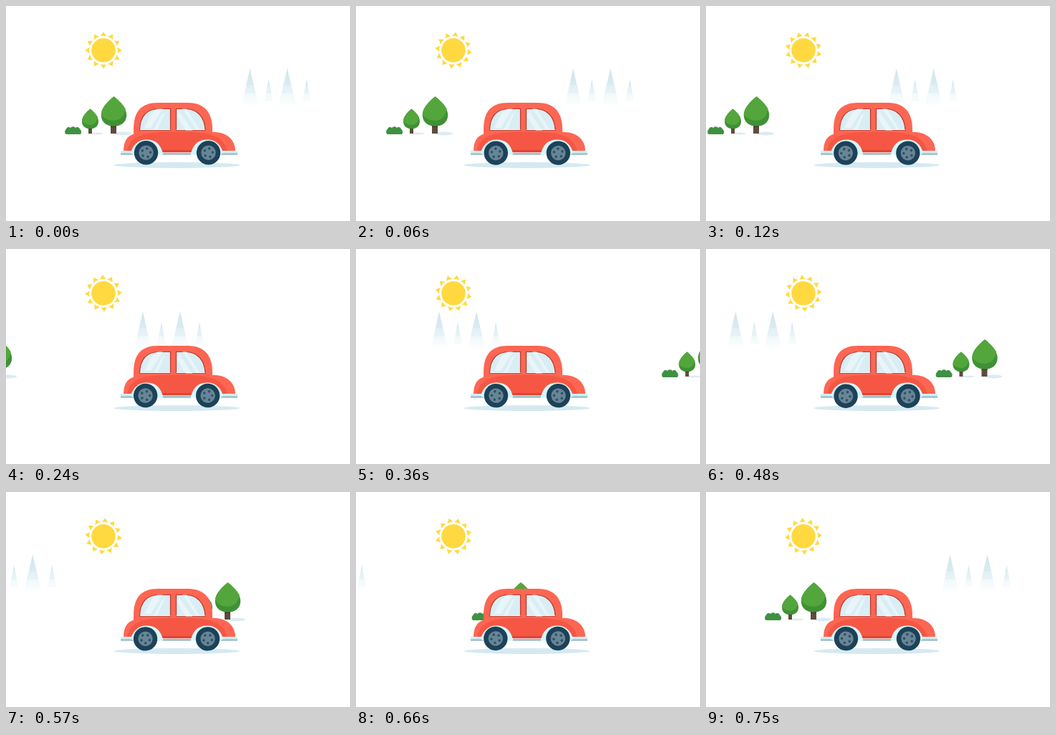
Write an HTML page that moves like this. It is 480 px wide and 300 px high and loops after 0.78 s.

```html
<!DOCTYPE html>
<html lang="en">
<head>
<meta charset="utf-8">
<title>Sunday drive</title>
<style>
html, body { margin: 0; width: 100%; height: 100%; overflow: hidden; background: #fff; }
svg { display: block; width: 100vw; height: 100vh; }
</style>
</head>
<body>
<svg viewBox="0 0 480 300">
  <defs>
    <linearGradient id="frost" gradientUnits="userSpaceOnUse" x1="0" y1="87" x2="0" y2="139">
      <stop offset="0" stop-color="#d0e6ed"/>
      <stop offset=".44" stop-color="#d9ebf1"/>
      <stop offset=".46" stop-color="#e2f0f5"/>
      <stop offset=".66" stop-color="#e6f3f7"/>
      <stop offset=".68" stop-color="#f2f8fa"/>
      <stop offset="1" stop-color="#fdfefe"/>
    </linearGradient>
    <path id="paneL" d="M186.5 173.5C187 154 196 143.5 214 143.5H229.5V173.5Z"/>
    <path id="paneR" d="M237.500 173.500V143.500H250C267 143.500 277.500 155 278 173.500Z"/>
    <clipPath id="glass"><use href="#paneL"/><use href="#paneR"/></clipPath>
    <g id="leaf">
      <path fill="#3f9135" d="M0 0C6 5 17.700 15 17.700 26C17.700 36 10 41.500 0 41.500C-10 41.500-17.700 36-17.700 26C-17.700 15-6 5 0 0Z"/>
      <path fill="#53a63b" d="M0 0C-6 5-17.700 15-17.700 25C-14 31-7 33.500 0 33.500C9 33.500 15 27 16 17C12 10 5 4 0 0Z"/>
    </g>
  </defs>

  <g id="sun" fill="#ffd93f"><circle r="16.800"/></g>
  <g id="firs" fill="url(#frost)"></g>

  <g id="grove">
    <g fill="#dcebf3">
      <ellipse cx="127" cy="178" rx="9" ry="1.500"/>
      <ellipse cx="163" cy="178" rx="12" ry="2.600"/>
    </g>
    <path fill="#3f9142" d="M84 179C81.500 178 81.500 173 84 172C84 169 89 168 90 170.500C91 167.500 96 167.500 97 170.500C98 168 103 169 103 172C105.500 173 106 178 103.500 179Z"/>
    <path fill="#5f4b3e" d="M115 169h5v9h-5ZM146 165h8v13h-8Z"/>
    <path fill="#483629" d="M115 169h5v3h-5ZM146 165h8v4h-8Z"/>
    <use href="#leaf" transform="translate(117.500 143.500) scale(.65 .67)"/>
    <use href="#leaf" transform="translate(150.500 126.300)"/>
  </g>

  <ellipse cx="238.500" cy="222" rx="88" ry="4" fill="#d5e9f1"/>
  <path fill="#fd6653" d="M178 184V172C178 148 188 135 212 135H254C278 135 288 150 288 172V184Z"/>
  <path fill="#fd6653" d="M164 203C164 190 168 181 180 178C200 175 270 175 292 176C310 177 320 188 320 203Z"/>
  <path fill="#f55744" d="M169 203C171 188 182 181 197 178C225 174.500 262 175 279 178C297 181 306 190 309 203Z"/>
  <path fill="#f55744" d="M212 198h52v6h-52Z"/>
  <path fill="#dc4534" d="M212 201h52v3.200h-52Z"/>

  <g fill="#d8edf4" stroke="#b5392b" stroke-width="1.200">
    <use href="#paneL"/><use href="#paneR"/>
  </g>
  <g clip-path="url(#glass)" fill="#e9f5f9">
    <path d="M203 150l9-7h7l-17 27h-9ZM217 152l5-4-11 25h-5ZM238 153l4-6 18 27h-9ZM246 143h6l18 30h-4Z"/>
    <path fill="#fff" d="M187 172.300h91v.9h-91Z"/>
  </g>

  <path fill="#c9f2f8" d="M160 202h19v3.200h-19ZM300 202h23v3.200h-23Z"/>
  <path fill="#9dbdc8" d="M160 205.200h18v2.600h-18ZM218 205h40v2.800h-40ZM300 205.200h23v2.600h-23Z"/>
  <path id="arch" fill="#d5f6fb" d="M174 205C177 194 184 186.500 196 186.500C209 186.500 216 193 219.500 207.500H178Z"/>
  <use href="#arch" transform="matrix(-1 0 0 1 477 0)"/>
  <g class="wheel"></g>
  <g class="wheel"></g>
</svg>
<script>
const STEP = 30, COUNT = 26;
const $ = s => document.querySelector(s);

function add(parent, tag, attrs) {
  const el = document.createElementNS('http://www.w3.org/2000/svg', tag);
  for (const k in attrs) el.setAttribute(k, attrs[k]);
  parent.append(el);
}
const place = (el, x, y = 0, turn = 0) =>
  el.setAttribute('transform', `translate(${x} ${y}) rotate(${turn})`);

const sun = $('#sun'), firs = $('#firs'), grove = $('#grove');
const wheels = [...document.querySelectorAll('.wheel')];

for (let i = 0; i < 12; i++)
  add(sun, 'path', { d: 'M0-25.800L4.200-19.500Q0-20.500-4.200-19.500Z', transform: `rotate(${i * 30})` });

// apex x, apex y, base y, half width
[[340.5, 87, 138, 11.5], [366.5, 102, 133, 6], [392.5, 87, 138, 12], [419.5, 102, 133, 6]]
  .forEach(([x, top, base, w]) => add(firs, 'path', { d: `M${x} ${top}L${x + w} ${base}H${x - w}Z` }));

for (const w of wheels) {
  add(w, 'circle', { r: 16.7, fill: '#1c4259' });
  add(w, 'circle', { r: 10.2, fill: '#688595' });
  for (let i = 0; i < 5; i++)
    add(w, 'circle', { cy: -6, r: 1.8, fill: '#2f5268', transform: `rotate(${i * 72 + 12})` });
}

function draw(n) {
  place(sun, 136, 61.8, n * 90 / COUNT);
  place(firs, n < 25 ? -18.7 * n : 0);
  place(grove, n < 10 ? -20 * n : 26.5 * (25 - n));

  // wheels turn twice per loop, slightly off their axle
  const turn = n * 720 / COUNT, a = turn * Math.PI / 180;
  wheels.forEach((w, i) =>
    place(w, 195 + i * 87 + .5 * Math.cos(a), 204.8 + .4 * Math.sin(a), turn));
}

function tick() {
  draw(Math.floor(performance.now() / STEP) % COUNT);
  requestAnimationFrame(tick);
}
tick();
</script>
</body>
</html>
```
